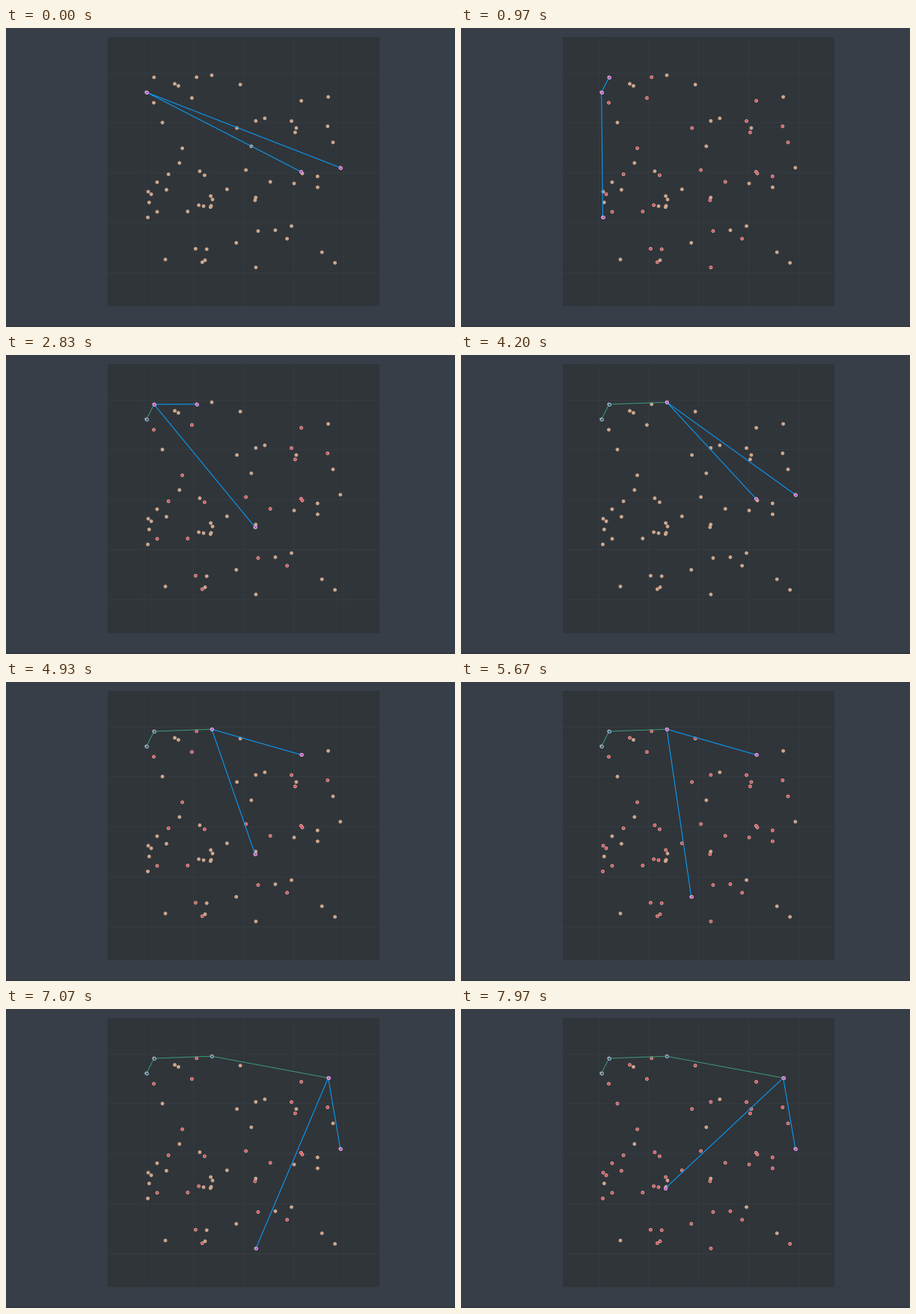
A matplotlib script for the animation above (8 s loop, 600x400 px).

```python
import numpy as np
import matplotlib.pyplot as plt
from matplotlib.animation import FuncAnimation
from matplotlib.patches import Rectangle

# Gift wrapping: from each hull point, scan all others for the outermost one.
W, H, DPI = 600, 400, 100
FRAMES, LOOP_MS = 240, 8000
PX = 72 / DPI

BACK, PANEL, GRID, STRIP = "#383e48", "#30353a", "#363b41", "#333840"
BLUE, GREEN = "#0a9bf5", "#3f9a78"
TAN, TAN_EDGE = "#d3a88a", "#cba68e"
RED, RED_EDGE = "#dc4860", "#d8a196"
PICK, PICK_EDGE = "#b648d6", "#dfa9d6"
DONE, DONE_EDGE = "#34495a", "#93c4de"

# Leftmost point first, the rest in the order they are scanned.
PTS = np.array([
    (187.7, 86), (394.3, 192.3), (353.2, 205.8), (235.6, 160.9),
    (381.5, 124.5), (242.8, 245.5), (429.8, 131.5), (197.8, 66),
    (375.6, 281.9), (217.1, 195.7), (320.6, 190), (262.3, 313.3),
    (386.4, 139.7), (248.4, 93.6), (202, 245.9), (396, 194.6),
    (254.7, 65.8), (336.9, 271.6), (197.5, 100), (265.4, 197),
    (394.6, 97.4), (253.4, 295.3), (332.8, 230.4), (257.6, 237),
    (333.9, 320.3), (416.3, 198.5), (194.1, 222.4), (308.6, 133.8),
    (268.2, 295.9), (437, 153), (189.5, 253.4), (359.9, 270.5),
    (225.5, 74.7), (385, 208), (295.3, 215.8), (264, 238.3),
    (387.9, 133.8), (258.9, 191.6), (313.1, 75.7), (266, 310.7),
    (275, 63.2), (416.4, 213.1), (190, 219), (333.8, 124.3),
    (273.6, 224.8), (307.7, 287.4), (209, 126.5), (439.6, 314.2),
    (201.9, 206.3), (430.6, 92.2), (214.4, 216.4), (273.3, 239.6),
    (327.8, 158.2), (422.2, 300), (231.8, 180.6), (333.7, 226.8),
    (230.4, 77.4), (381.5, 265), (213, 309.7), (276, 229.4),
    (345.8, 120.8), (191.3, 233.4), (274.1, 237.9), (446.8, 186.9),
])
LAST = len(PTS) - 1


def outside(a, b, c):
    """True if c lies left of the ray from a to b on screen."""
    (ux, uy), (vx, vy) = PTS[b] - PTS[a], PTS[c] - PTS[a]
    return ux * vy - uy * vx < 0


def wrap_steps(count):
    hull, steps = [0], []
    while len(steps) < count:
        anchor, best = hull[-1], LAST
        for cand in range(1, LAST + 1):
            steps.append((tuple(hull), best, cand))
            if cand != anchor and outside(anchor, best, cand):
                best = cand
        hull.append(best)
    return steps[:count]


STEPS = wrap_steps(FRAMES)

fig = plt.figure(figsize=(W / DPI, H / DPI), dpi=DPI, facecolor=BACK)
ax = fig.add_axes([0, 0, 1, 1])
ax.set_xlim(0, W)
ax.set_ylim(H, 0)
ax.axis("off")

ax.add_patch(Rectangle((136, 12), 362.5, 359.5, fc=PANEL, lw=0, zorder=0))
ax.add_patch(Rectangle((0, 398), W, 2, fc=STRIP, lw=0, zorder=0))
for k in range(5):
    gx, gy = 183.5 + 66.9 * k, 59.5 + 66.9 * k
    ax.plot([gx, gx], [12, 371.5], color=GRID, lw=PX, zorder=1)
    ax.plot([136, 498.5], [gy, gy], color=GRID, lw=PX, zorder=1)


def dots(pts, face, edge, z):
    return ax.scatter(pts[:, 0], pts[:, 1], s=(3.8 * PX) ** 2, c=face,
                      edgecolors=edge, linewidths=PX, zorder=z)


base = dots(PTS, TAN, TAN_EDGE, 2)
hull_line, = ax.plot([], [], color=GREEN, lw=PX, zorder=3)
rays, = ax.plot([], [], color=BLUE, lw=1.1 * PX, zorder=4)
done = dots(PTS[:1], DONE, DONE_EDGE, 5)
picks = dots(PTS[:1], PICK, PICK_EDGE, 6)


def draw(i):
    hull, best, cand = STEPS[i]
    anchor = hull[-1]
    seen = [0 < k < cand for k in range(len(PTS))]
    base.set_facecolors([RED if s else TAN for s in seen])
    base.set_edgecolors([RED_EDGE if s else TAN_EDGE for s in seen])
    hull_line.set_data(*PTS[list(hull)].T)
    rays.set_data(*PTS[[best, anchor, cand]].T)
    done.set_offsets(PTS[list(hull)])
    picks.set_offsets(PTS[[anchor, best, cand]])
    return base, hull_line, rays, done, picks


anim = FuncAnimation(fig, draw, frames=FRAMES, interval=LOOP_MS / FRAMES,
                     init_func=lambda: draw(0), repeat=True, repeat_delay=0)
plt.show()
```
